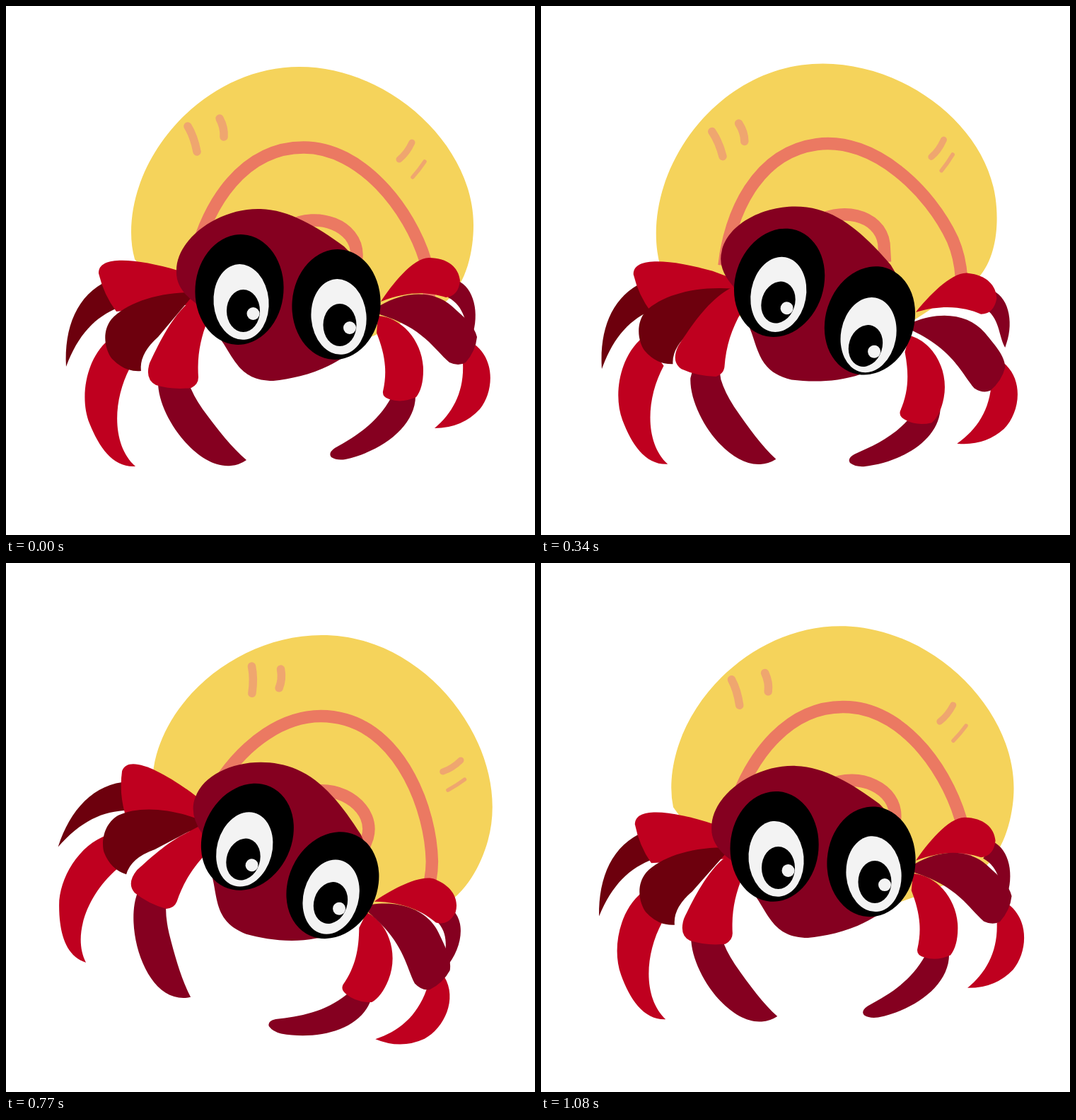
An HTML page for the animation above (1.11 s loop, 748 by 748 pixels).

```html
<!DOCTYPE html>
<html lang="en">
<head>
<meta charset="utf-8">
<title>Hermit crab</title>
<style>
  html, body { margin: 0; width: 100%; height: 100%; overflow: hidden; background: #fff; }
  svg { display: block; width: 100%; height: 100%; }
  .shell { fill: #f5d35b; }
  .ring { fill: none; stroke: #eb7962; stroke-width: 17.5; }
  .marks { fill: none; stroke: #efa66f; stroke-width: 11.5; stroke-linecap: round; }
  .crimson { fill: #850020; }
  .red { fill: #bf001f; }
  .dark { fill: #6d000d; }
  .white { fill: #f3f3f3; }
</style>
</head>
<body>
<!-- Every part swings about the body; data-lag is when it starts, in ms. -->
<svg viewBox="0 0 748 748">
  <defs>
    <ellipse id="rim" cx="330" cy="401" rx="62.5" ry="78" transform="rotate(4 330 401)"/>
    <ellipse id="ball" cx="332.5" cy="418.5" rx="39" ry="53.5" transform="rotate(-5 332 418)"/>
    <g id="pupil">
      <ellipse cx="335.5" cy="431" rx="23.5" ry="30"/>
      <circle class="white" cx="349.5" cy="435" r="9"/>
    </g>
  </defs>

  <g data-lag="245">
    <path class="shell" d="M177 320C177 205 285 86 415 86C540 86 661 195 661 310C661 345 652 392 622 418L530 462L440 500L330 440Q230 420 182 358Q177 340 177 320Z"/>
    <path class="ring" d="M268 352C285 282 335 200 421 200C503 200 571 288 593 360Q600 385 598 415M400 312C440 290 496 310 496 352L494 378"/>
  </g>
  <g class="marks">
    <path data-lag="204" d="M257 170Q266 185 270 206"/>
    <path data-lag="218" d="M302 159Q309 172 308 185"/>
    <path data-lag="180" style="stroke-width:9" d="M574 193Q567 208 556 217"/>
    <path data-lag="196" style="stroke-width:5.5" d="M592 220Q584 232 575 242"/>
  </g>

  <path data-lag="175" class="dark" d="M145 388C100 408 82 455 85 510C102 465 125 440 160 426Z"/>
  <path data-lag="158" class="red" d="M145 472C112 500 104 555 118 590C132 625 152 653 183 651C150 622 150 560 175 512Z"/>
  <path data-lag="147" class="crimson" d="M220 510L215 532C215 580 270 655 318 650Q330 649 340 642C320 625 300 600 278 570Q264 550 258 532L254 510Z"/>
  <path data-lag="172" class="red" d="M131 378C130 352 185 357 243 374L285 390L285 420L156 432Q138 408 131 378Z"/>
  <path data-lag="137" class="dark" d="M268 405C215 404 170 420 149 443C134 462 141 488 150 499Q168 518 191 516Q188 492 215 468Z"/>
  <path data-lag="92" class="red" d="M266 413C235 435 215 480 203 505Q196 528 212 536Q235 543 262 540Q272 535 272 525C270 495 275 470 285 445Z"/>

  <path data-lag="135" class="crimson" d="M638 388C662 398 670 435 659 467C648 450 650 425 625 412Z"/>
  <path data-lag="112" class="red" d="M662 478C692 500 690 545 670 570Q645 597 606 597C632 575 648 545 646 505Z"/>
  <path data-lag="107" class="crimson" d="M545 553C525 590 495 608 465 625Q455 632 460 638Q468 643 480 641C530 630 580 595 579 550Z"/>
  <path data-lag="113" class="red" d="M530 418C545 395 575 356 598 356C625 356 640 370 642 388Q640 410 622 412C600 405 570 402 530 418Z"/>
  <path data-lag="68" class="red" d="M526 438C560 440 590 475 590 515Q590 540 580 553Q560 562 542 556Q532 553 533 545C540 515 535 490 524 462Z"/>
  <path data-lag="86" class="crimson" d="M528 424C565 402 605 402 630 424C650 442 662 452 666 468Q664 488 650 504Q640 510 627 504C605 485 590 455 528 436Z"/>

  <path data-lag="50" class="crimson" d="M241 375C240 330 300 285 360 287C400 288 440 312 478 340Q520 380 525 430Q510 480 472 500C440 520 405 527 378 530C335 530 325 505 308 478L268 420Q240 400 241 375Z"/>
  <g data-lag="42">
    <use href="#rim"/>
    <use href="#rim" x="137" y="21"/>
  </g>
  <g data-lag="28" class="white">
    <use href="#ball"/>
    <use href="#ball" x="138" y="21"/>
  </g>
  <g data-lag="0">
    <use href="#pupil"/>
    <use href="#pupil" x="136.5" y="20"/>
  </g>
</svg>
<script>
  const LOOP = 1110, FRAMES = 33, SWING = 24;
  const step = LOOP / FRAMES;
  const parts = [...document.querySelectorAll('[data-lag]')];

  const ease = p => p < 0.5 ? 4 * p ** 3 : 1 - 4 * (1 - p) ** 3;

  // Angle at a time: eased there and back once per loop.
  function angle(time, lag) {
    const p = (time - lag + LOOP) % LOOP / (LOOP / 2);
    return SWING * (p < 1 ? ease(p) : 1 - ease(p - 1));
  }

  function draw(now) {
    const time = Math.floor((now % LOOP + 4) / step) % FRAMES * step;
    for (const part of parts) {
      const lag = +part.dataset.lag;
      // Shapes are drawn in the pose they have at time zero.
      const turn = angle(time, lag) - angle(0, lag);
      part.setAttribute('transform', `rotate(${turn} 373 425)`);
    }
  }

  const start = performance.now();
  function tick() {
    draw(performance.now() - start);
    requestAnimationFrame(tick);
  }
  tick();
</script>
</body>
</html>
```
